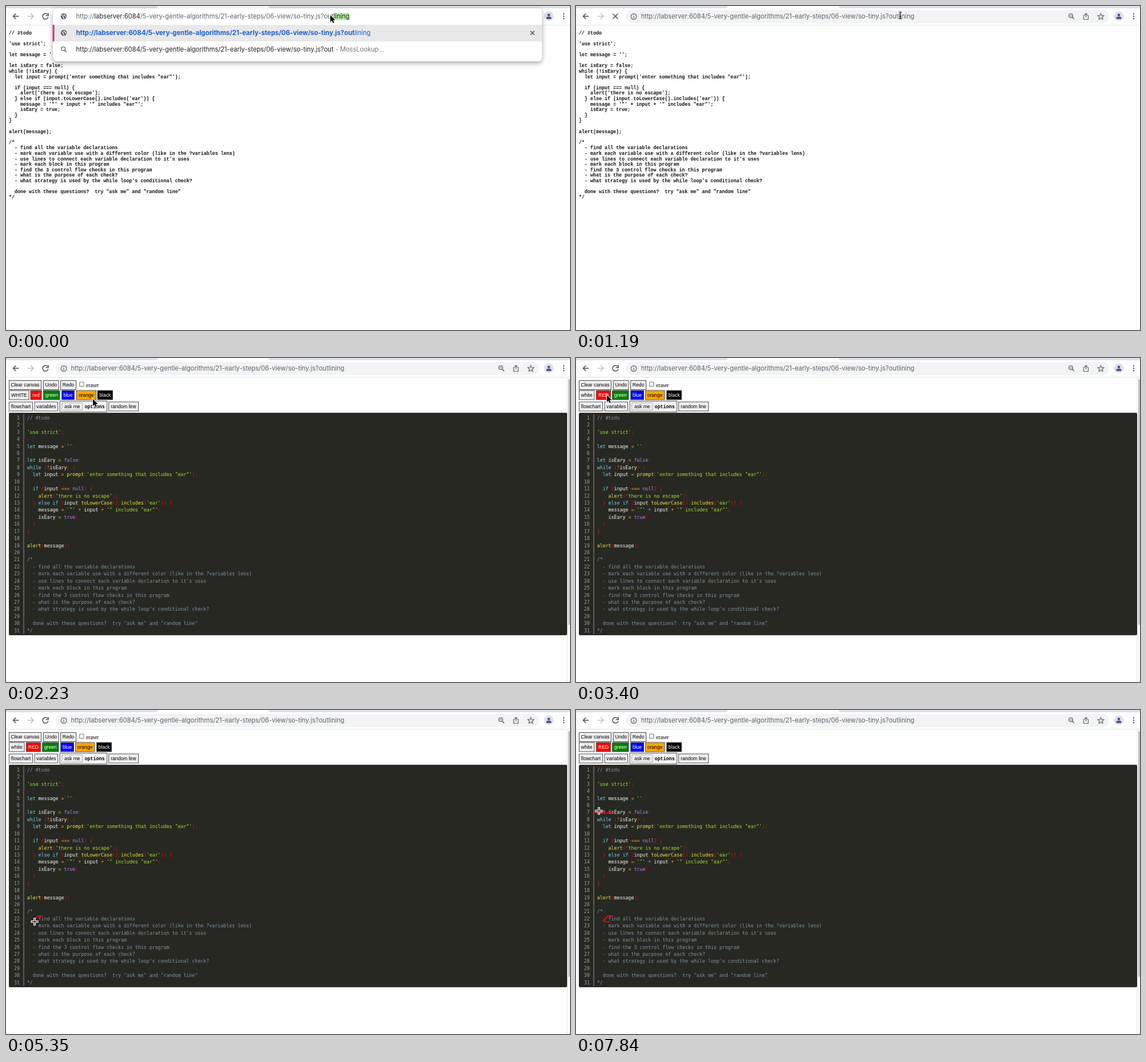
Animation, 986 px wide and 568 px high, one loop 7.99 s. Source, as an HTML page with a canvas:

```html
<!DOCTYPE html>
<html lang="en">
<head>
<meta charset="utf-8">
<title>Code page with drawing tools</title>
<style>
  html, body { margin: 0; width: 100%; height: 100%; overflow: hidden; background: #fefefe; }
  canvas { display: block; }
</style>
</head>
<body>
<canvas id="stage" width="986" height="568"></canvas>
<script>
const ctx = document.getElementById('stage').getContext('2d');
const LOOP = 7990, TICK = 148;

const UI = '11.12px Inter, sans-serif';
const UI_BOLD = 'bold 11.38px Inter, sans-serif';
const PLAIN_CODE = 'bold 8.35px "Liberation Mono", monospace';
const DARK_CODE = '8.27px "DejaVu Sans Mono", monospace';
const BUTTON = '8.57px "Liberation Sans", sans-serif';
const GREY = '#5f6368', INK = '#202124', BLUE = '#1a5fd0';

const SCHEME = 'http://', HOST = 'labserver:6084';
const PATH = '/5-very-gentle-algorithms/21-early-steps/06-view/so-tiny.js?';
const QUERY = 'outlining';
const ADDRESS = SCHEME + HOST + PATH;

const CODE = `// #todo

'use strict';

let message = '';

let isEary = false;
while (!isEary) {
  let input = prompt('enter something that includes "ear"');

  if (input === null) {
    alert('there is no escape');
  } else if (input.toLowerCase().includes('ear')) {
    message = '"' + input + '" includes "ear"';
    isEary = true;
  }
}

alert(message);

/*
  - find all the variable declarations
  - mark each variable use with a different color (like in the ?variables lens)
  - use lines to connect each variable declaration to it's uses
  - mark each block in this program
  - find the 3 control flow checks in this program
  - what is the purpose of each check?
  - what strategy is used by the while loop's conditional check?

  done with these questions?  try "ask me" and "random line"
*/`.split('\n');

// Groups: string, keyword, literal, function, operator, punctuation, name
const TOKEN = /('[^']*')|\b(let|while|if|else)\b|\b(true|false|null)\b|(\w+(?=\())|([=!+]+)|([(){};.])|(\w+)/g;
const TOKEN_COLORS = ['#a6e22e', '#66d9ef', '#ae81ff', '#f4e53a', '#f59a00', '#ff0000', '#f8f8f2'];
const COMMENT = '#8292a2';

// Pointer path: tick, x, y
const POINTER = [
  [0, 567, 16], [12, 567, 16], [13, 470, 26], [14, 250, 58], [15, 152, 72], [17, 95, 68],
  [20, 54, 65], [23, 54, 65], [25, 58, 125], [28, 63, 330], [30, 64, 361], [31, 64, 361],
  [33, 56, 361], [35, 48, 369], [36, 50, 371], [37, 58, 371.5], [38, 58, 346], [39, 58, 280],
  [40, 58, 216], [41, 58, 216], [43, 65, 184], [45, 65, 181.5], [46, 65, 180.5],
  [50, 45, 180.5], [52, 33, 179.5], [53, 40, 177]
];
const PEN_STROKES = [[31, 37], [46, 52]];

function pointerAt(n) {
  const i = POINTER.findIndex(p => p[0] >= n);
  const b = POINTER[i], a = POINTER[Math.max(0, i - 1)];
  const k = b[0] > a[0] ? (n - a[0]) / (b[0] - a[0]) : 0;
  return [a[1] + (b[1] - a[1]) * k, a[2] + (b[2] - a[2]) * k];
}

function rect(x, y, w, h, color, radius = 0) {
  ctx.fillStyle = color;
  ctx.beginPath();
  ctx.roundRect(x, y, w, h, radius);
  ctx.fill();
}

function stroke(path, color = GREY, width = 1.5) {
  ctx.strokeStyle = color;
  ctx.lineWidth = width;
  ctx.stroke(new Path2D(path));
}

function dot(x, y, r, color) {
  rect(x - r, y - r, 2 * r, 2 * r, color, r);
}

function ring(x, y, r, width = 1.3) {
  ctx.strokeStyle = GREY;
  ctx.lineWidth = width;
  ctx.beginPath();
  ctx.arc(x, y, r, 0, 7);
  ctx.stroke();
}

// Draws text and returns the x where it ends
function text(str, x, y, font, color, align = 'left') {
  ctx.font = font;
  ctx.fillStyle = color;
  ctx.textAlign = align;
  ctx.fillText(str, x, y);
  return x + ctx.measureText(str).width;
}

function globe(x, y) {
  dot(x, y, 5.3, GREY);
  stroke(`M${x - 4} ${y - 2}l3 2v2l2 2M${x + 1} ${y - 4}l-1 2l3 1l1 3`, '#fff', 1.2);
}

function magnifier(x, y) {
  ring(x - 1, y - 1, 3.4);
  stroke(`M${x + 1.5} ${y + 1.5}l3.5 3.5`);
}

function drawToolbar(loading) {
  rect(0, 0, 986, 33, '#fff');
  rect(0, 0, 265, 4, '#dee1e6', [0, 0, 4, 0]);
  rect(459, 0, 527, 4, '#dee1e6', [0, 0, 0, 4]);
  rect(0, 33, 986, 1, '#dfe1e4');
  stroke('M22.5 18H13M17.3 13.2L12.5 18l4.8 4.8', '#4a4d51');
  stroke('M38 18h9.5M43.2 13.2L48 18l-4.8 4.8', '#bcbec1');
  if (loading) stroke('M64.3 13.5l9 9m0-9l-9 9', '#4a4d51');
  else {
    stroke('M72.8 14.8A5 5 0 1 0 73.8 19.5', '#4a4d51');
    stroke('M74 12.5v4.2h-4.2', '#4a4d51', 1.6);
  }
  dot(949, 18, 8.5, '#dbe0f0');
  dot(949, 15.8, 2.3, '#43507a');
  rect(944.5, 18.8, 9, 4, '#43507a', [4, 4, 1, 1]);
  for (const y of [13.8, 18, 22.2]) dot(975, y, 1.3, GREY);
}

function drawAddressBar() {
  rect(87, 7, 845, 23, '#f1f3f4', 11.5);
  ring(101, 18.5, 4.9, 1.2);
  stroke('M101 17.8v3.6M101 15.2v1.4', GREY, 1.3);
  text(ADDRESS + QUERY, 113.5, 22, UI, GREY);
  magnifier(866, 18);
  stroke('M863.3 17h3.4', GREY, 1);
  stroke('M889.5 16.5h-2v7h8v-7h-2M891.5 20v-7M889 15.3l2.5-2.5l2.5 2.5', GREY, 1.2);
  stroke('M917.5 13.2l1.5 3.5l3.8.3l-2.9 2.5l.9 3.7l-3.3-2l-3.3 2l.9-3.7l-2.9-2.5l3.8-.3z', GREY, 1.2);
}

function drawSuggestions(typedCount) {
  const typed = QUERY.slice(0, typedCount), rest = QUERY.slice(typedCount);
  ctx.save();
  ctx.shadowColor = 'rgba(0,0,0,.35)';
  ctx.shadowBlur = 9;
  ctx.shadowOffsetY = 3;
  rect(82, 4, 855, 93, '#fff', 7);
  ctx.restore();
  rect(82, 33, 855, 29, '#e8e8e9');
  rect(81.5, 33, 3, 29, '#d92f86');
  globe(101, 18);
  globe(101, 47);
  magnifier(101, 76);
  stroke('M916.8 43.8l7 7m0-7l-7 7', '#4a4d51', 1.3);

  let x = text(SCHEME, 122.5, 22, UI, GREY);
  x = text(HOST, x, 22, UI, INK);
  x = text(PATH + typed, x, 22, UI, GREY);
  if (rest) {
    rect(x, 12, ctx.measureText(rest).width, 13, '#b3f3a6');
    text(rest, x, 22, UI, INK);
  }
  x = text(ADDRESS + typed, 122.5, 51, UI_BOLD, BLUE);
  text(rest, x, 51, UI, BLUE);
  x = text(ADDRESS + typed, 122.5, 80, UI, INK);
  text(' - MossLookup...', x, 80, UI, '#74777b');
}

function drawPlainPage() {
  CODE.forEach((line, i) => text(line, 5, 49.7 + i * 9.6, PLAIN_CODE, '#111'));
}

function button(label, x, y, right, fill = '#efefef', color = '#000') {
  rect(x, y, right - x, 17, '#4c4c4c');
  rect(x + 1, y + 1, right - x - 2, 15, fill);
  text(label, (x + right) / 2, y + 11.4, BUTTON, color, 'center');
}

function checkbox(x, y) {
  rect(x, y, 8.5, 8.5, '#767676', 1.5);
  rect(x + 1, y + 1, 6.5, 6.5, '#fff', 1);
}

function drawTools(ready, redChosen) {
  button('Clear canvas', 5, 39, 62);
  button('Undo', 65, 39, 92.5);
  button('Redo', 95, 39, 123);
  checkbox(128, 41.5);
  text('eraser', 140, 50.5, '9.3px "Liberation Serif", serif', '#000');

  const fills = ['#efefef', 'red', 'green', 'blue', 'orange', 'black'];
  const names = ['white', ...fills.slice(1)];
  const lefts = redChosen ? [5, 35, 63, 95, 121, 158] : [5, 42.5, 65, 97, 122.5, 159.5];
  const rights = redChosen ? [32.5, 61, 92.5, 119, 155, 185] : [40.5, 62.5, 94.5, 120, 158, 187];
  names.forEach((name, i) => {
    const label = i === +redChosen ? name.toUpperCase() : name;
    button(label, lefts[i], 56.5, rights[i], fills[i], i === 0 || i === 4 ? '#000' : '#fff');
  });

  const y = ready ? 76.5 : 74.5;
  button('flowchart', 5, y, 47);
  button('variables', 49.5, y, 91);
  if (ready) {
    rect(93.5, 75, 83.5, 20, '#4c4c4c');
    rect(94.5, 76, 81.5, 18, '#f4f4f4');
    rect(97, 78, 37.5, 14, '#aaa', 2);
    rect(98, 79, 35.5, 12, '#efefef', 1);
    text('ask me', 115.8, 88, BUTTON, '#000', 'center');
    text('options', 137.5, 88, PLAIN_CODE, '#000');
    button('random line', 179, y, 232);
  } else {
    checkbox(93, 81.5);
    button('random line', 103.5, y, 156);
  }
}

function drawEditor(top) {
  rect(5, top, 976, 390, '#272822', 2);
  rect(30.5, top + 2, 1, 386, '#8f908a');
  ctx.font = DARK_CODE;
  const charWidth = ctx.measureText('0').width;
  CODE.forEach((line, i) => {
    const y = top + 11.8 + i * 12.43;
    text(i + 1, 24, y, DARK_CODE, '#a0a09c', 'right');
    if (i === 0 || i >= 20) {
      text(line, 36.7, y, DARK_CODE, COMMENT);
      return;
    }
    for (const match of line.matchAll(TOKEN)) {
      const kind = match.slice(1).findIndex(Boolean);
      text(match[0], 36.7 + match.index * charWidth, y, DARK_CODE, TOKEN_COLORS[kind]);
    }
  });
}

function drawMarks(n) {
  ctx.strokeStyle = '#f00010';
  ctx.lineWidth = 2;
  ctx.lineCap = ctx.lineJoin = 'round';
  for (const [from, to] of PEN_STROKES) {
    ctx.beginPath();
    for (let k = from; k <= Math.min(n, to); k++) ctx.lineTo(...pointerAt(k));
    ctx.stroke();
  }
  ctx.lineCap = 'butt';
  ctx.lineJoin = 'miter';
}

function drawPointer(n) {
  const [x, y] = pointerAt(n);
  ctx.save();
  ctx.translate(x, y);
  if (y > 96) {
    stroke('M-6.5 0h13M0 -6.5v13', '#fff', 4);
    stroke('M-5.5 0h11M0 -5.5v11', '#222', 1.4);
  } else if (n >= 7 && y < 34) {
    stroke('M-2.5 -5.5q2.5 0 2.5 1.5v9q0 1.5 -2.5 1.5M2.5 -5.5q-2.5 0 -2.5 1.5v9q0 1.5 2.5 1.5M-1.5 2.5h3', '#111', 1.2);
  } else {
    const arrow = 'M0 0v12l2.8-2.5l2 4.5l2-.9l-2-4.3h3.9z';
    stroke(arrow, '#fff', 1.8);
    ctx.fillStyle = '#000';
    ctx.fill(new Path2D(arrow));
  }
  ctx.restore();
}

function draw(time) {
  const n = Math.min(53, Math.floor((time % LOOP + 10) / TICK));
  rect(0, 0, 986, 568, '#fefefe');
  if (n < 10) drawPlainPage();
  else {
    const ready = n >= 11;
    rect(980.5, 34, 5.5, 534, '#fafafa');
    rect(980.5, 34, 1, 534, '#e6e6e6');
    rect(983, 37, 3, 431, '#c1c1c1', 1.5);
    drawTools(ready, n >= 23);
    drawEditor(ready ? 96 : 92);
    drawMarks(n);
  }
  drawToolbar(n >= 8 && n < 11);
  if (n < 7) drawSuggestions(3 + Math.min(6, Math.round(n * 6 / 5)));
  else drawAddressBar();
  drawPointer(n);
}

const start = performance.now();
function loop() {
  draw(performance.now() - start);
  requestAnimationFrame(loop);
}
loop();
</script>
</body>
</html>
```
